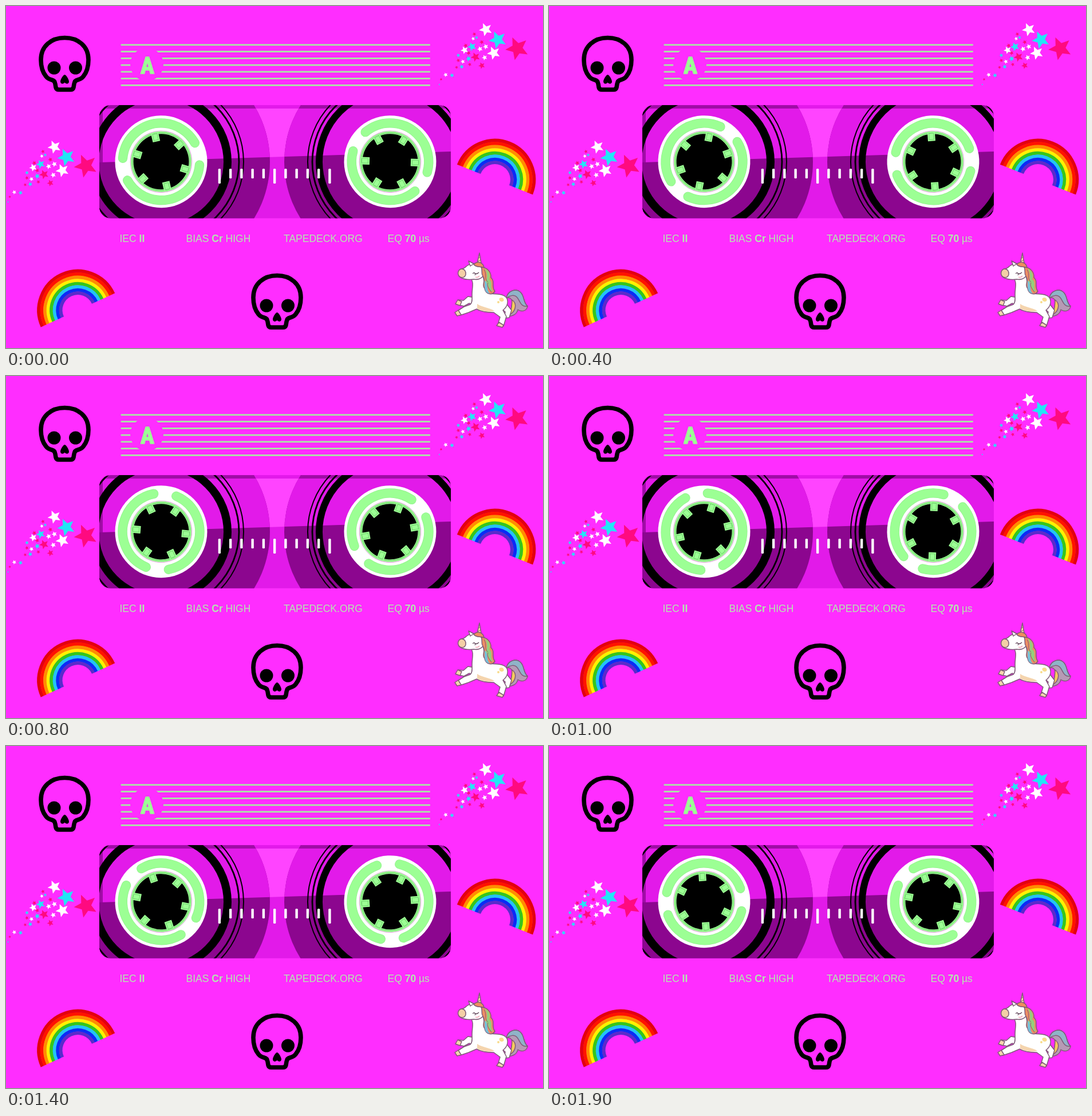
An HTML page with a canvas that plays this animation: 938x597 px, repeating every 2 s.

```html
<!DOCTYPE html>
<html lang="en">
<head>
<meta charset="utf-8">
<title>Cassette</title>
<style>
html, body { margin: 0; width: 100%; height: 100%; overflow: hidden; background: #ff2dff; }
canvas { display: block; }
</style>
</head>
<body>
<canvas id="stage" width="938" height="597"></canvas>
<script>
const ctx = document.getElementById('stage').getContext('2d');
const TAU = Math.PI * 2, RAD = Math.PI / 180;
const PINK = '#ff2dff', GREEN = '#9cff94', MINT = '#b2eaae';
const LOOP = 2000, STEP = 100, TURN = -9;

function at(x, y, deg, draw) {
  ctx.save();
  ctx.translate(x, y);
  ctx.rotate(deg * RAD);
  draw();
  ctx.restore();
}

function disc(x, y, r, color) {
  ctx.fillStyle = color;
  ctx.beginPath();
  ctx.arc(x, y, r, 0, TAU);
  ctx.fill();
}

function ring(x, y, r, width, color, from = 0, to = 360) {
  ctx.strokeStyle = color;
  ctx.lineWidth = width;
  ctx.beginPath();
  ctx.arc(x, y, r, from * RAD, to * RAD);
  ctx.stroke();
}

function shape(d, fill, stroke, width) {
  const path = new Path2D(d);
  if (fill) {
    ctx.fillStyle = fill;
    ctx.fill(path);
  }
  if (stroke) {
    ctx.strokeStyle = stroke;
    ctx.lineWidth = width;
    ctx.stroke(path);
  }
}

// Label area
function drawLabel() {
  ctx.fillStyle = '#a8eaa4';
  for (let i = 0; i < 7; i++) {
    ctx.beginPath();
    ctx.roundRect(200.5, 66.6 + i * 11.75, 540.5, 2.7, 1.3);
    ctx.fill();
  }
  disc(246, 102, 29, PINK);
  ctx.fillStyle = ctx.strokeStyle = GREEN;
  ctx.lineWidth = 1.6;
  ctx.textAlign = 'center';
  ctx.font = '900 40px "Roboto Condensed", "Open Sans Condensed", Roboto, sans-serif';
  ctx.fillText('A', 247, 118);
  ctx.strokeText('A', 247, 118);
}

function drawText(x, parts) {
  ctx.textAlign = 'left';
  ctx.fillStyle = MINT;
  parts.forEach((part, i) => {
    ctx.font = (i % 2 ? 'bold ' : '') + '17.5px "Liberation Sans", Arial, sans-serif';
    ctx.fillText(part, x, 412);
    x += ctx.measureText(part).width;
  });
}

// Window with the two tape packs
function below(color) {
  ctx.fillStyle = color;
  ctx.beginPath();
  ctx.moveTo(163, 273);
  ctx.lineTo(777, 254);
  ctx.lineTo(777, 371);
  ctx.lineTo(163, 371);
  ctx.fill();
}

// Fills one layer with its shaded rim and its darker lower part
function drawLayer(light, rim, dark) {
  ctx.fillStyle = rim;
  ctx.fillRect(163, 173, 614, 198);
  ctx.fillStyle = light;
  ctx.fillRect(169, 179, 608, 192);
  below(dark);
}

function drawWindow() {
  ctx.save();
  ctx.beginPath();
  ctx.roundRect(163, 173, 614, 197.5, 20);
  ctx.clip();
  drawLayer('#ff44ff', '#e21ae9', '#e21ae9');

  ctx.save();
  ctx.beginPath();
  ctx.arc(271, 272, 190, 0, TAU);
  ctx.moveTo(856, 272);
  ctx.arc(671, 272, 185, 0, TAU);
  ctx.clip();
  drawLayer('#e21ae9', '#a00ca6', '#8c068f');
  ctx.restore();

  ring(271, 272, 116, 14, '#000');
  ring(671, 272, 124, 12, '#000');
  for (const x of [271, 671]) {
    ring(x, 272, 136, 2.8, '#000');
    ring(x, 272, 144, 2, '#000');
  }
  ctx.restore();
}

function drawTicks() {
  ctx.fillStyle = '#fff';
  for (let i = 0; i < 11; i++) {
    ctx.beginPath();
    ctx.roundRect(370.7 + i * 19.25, 284, 4.4, i % 5 ? 17 : 26, 1.5);
    ctx.fill();
  }
}

function drawReel(x, y, deg) {
  at(x, y, deg, () => {
    disc(0, 0, 80.5, '#fff');
    ctx.lineCap = 'round';
    for (const start of [17, 197]) {
      ring(0, 0, 67.3, 16.4, '#8ff08a', start, start + 146);
      ring(0, 0, 67.3, 15, GREEN, start, start + 146);
    }
    ctx.lineCap = 'butt';
    disc(0, 0, 53.5, GREEN);
    ring(0, 0, 53.8, 0.8, '#f58cf0');
    ring(0, 0, 50.5, 0.8, '#5fb65c');
    disc(0, 0, 48.5, '#000');
    for (let i = 0; i < 6; i++) {
      at(0, 0, i * 60 - 31, () => {
        ctx.fillStyle = GREEN;
        ctx.fillRect(36, -6.5, 14.5, 13);
        ctx.strokeStyle = '#68c565';
        ctx.lineWidth = 0.8;
        ctx.strokeRect(38.5, -4, 11, 8);
      });
    }
  });
}

// Stickers
function drawSkull(dx, dy) {
  at(dx, dy, 0, () => {
    ctx.lineJoin = 'round';
    shape('M61 94C61 70 79 55.5 102.5 55.5S144 70 144 94C144 107 140 117 135 123Q132 127 125 129' +
      'Q120 130 119 136L118 142Q117 146 113 146H92Q88 146 87 142L86 136Q85 130 80 129' +
      'Q73 127 70 123C65 117 61 107 61 94Z', null, '#000', 7.6);
    disc(84, 108, 11.5, '#000');
    disc(121.5, 108, 11.5, '#000');
    shape('M102.5 120C105 120 110 128 110 132C110 136 105 137 102.5 133.5' +
      'C100 137 95 136 95 132C95 128 100 120 102.5 120Z', '#000');
  });
}

const BANDS = ['#e3000f', '#ff1200', '#ff8c00', '#fff200', '#35c71a', '#22c4f5', '#0a2cf5', '#5a2bcb'];

function drawRainbow(x, y, deg) {
  at(x, y, deg, () => BANDS.forEach((color, i) => ring(0, 0, 68.3 - i * 5.5, 5.8, color, 180, 360)));
}

const STARS = {
  '#ff0a80': [[893, 74, 21], [820, 89, 8.5], [831, 104, 6], [831, 63, 4], [803, 69, 4], [818, 49, 3.5],
    [808, 82, 4], [790, 95, 3.5], [787, 107, 3], [810, 102, 3.5], [760, 128, 2.5]],
  '#22e6f5': [[859, 59, 16], [814, 71, 8], [808, 92, 5], [822, 55, 3], [790, 86, 3.5], [796, 106, 4],
    [779, 121, 4], [757, 137, 1.5]],
  '#ffffff': [[838, 41, 12], [852, 82, 12], [801, 77, 7], [838, 71, 5], [828, 75, 5], [836, 90, 5],
    [816, 57, 3.5], [798, 97, 4], [768, 120, 4]]
};

function drawStar(x, y, r) {
  ctx.beginPath();
  for (let i = 0; i < 10; i++) {
    const a = (i * 36 - 42) * RAD, d = i % 2 ? r * 0.45 : r;
    ctx.lineTo(x + d * Math.cos(a), y + d * Math.sin(a));
  }
  ctx.fill();
}

function drawStars(dx, dy) {
  at(dx, dy, 0, () => {
    for (const color in STARS) {
      ctx.fillStyle = color;
      STARS[color].forEach(s => drawStar(...s));
    }
  });
}

function drawUnicorn() {
  const line = '#805a78', tan = '#f5d5ae';
  const part = (d, fill) => shape(d, fill, line, 1.5);
  ctx.lineJoin = 'round';
  // Tail
  part('M874 510C876 497 891 492 899 500C906 507 903 517 911 524C910 532 901 535 894 530' +
    'C893 537 885 543 875 541C884 533 883 525 884 518C884 510 879 508 874 510Z', '#b79ab5');
  part('M874 510C876 497 891 492 899 500C906 507 903 517 911 524C899 526 898 515 893 509C888 503 880 505 874 510Z', '#8fb4c8');
  part('M884 513C893 519 892 535 875 541C884 533 883 525 884 513Z', '#f7c95f');
  // Far legs
  part('M824 510L807 507L799 514L790 513L787 521L800 524L809 519L825 524Z', '#fff');
  part('M860 523L872 534L870 545L879 544L883 531L872 517Z', '#fff');
  // Neck, body and near legs
  part('M811 473C818 482 814 492 814 503C814 511 815 518 811 521L800 525L789 532L793 540' +
    'L808 535L822 529C832 535 844 535 852 535L863 543L860 553L869 559L874 542L868 531' +
    'C877 524 879 513 872 507C862 499 848 507 838 497L833 469Z', '#fff');
  shape('M823 520C831 526 843 526 853 532C844 535 832 533 823 528Z', tan);
  shape('M862 510C867 507 871 511 869 515C865 518 860 514 862 510Z', '#f8dc8c');
  disc(860, 517, 2, '#f8dc8c');
  part('M789 513L796 516L793 523L785 520Z', tan);
  part('M790 531L795 539L788 541L784 535Z', tan);
  part('M861 552L869 557L867 561L857 558Z', tan);
  // Head
  part('M806 453C816 446 833 450 836 461C837 472 828 479 817 477C809 478 800 477 794 474' +
    'C788 470 789 461 795 459C800 459 802 456 806 453Z', '#fff');
  part('M795 459C801 458 804 464 803 469C801 475 795 475 792 472C788 468 789 461 795 459Z', '#f3cfa5');
  part('M811 454L808 445L817 450Z', '#fff');
  part('M822 454L827 431L831 455Z', '#f6dfa6');
  shape('M824 446L830 443M823 451L831 448M825 440L829 438', null, line, 1);
  shape('M817 465Q821 470 826 465M817 466L815 467M820 468L819 470', null, '#604458', 1.3);
  shape('M820 473Q824 475 827 471', null, '#f5a5b5', 1.5);
  // Mane
  part('M830 456C841 456 848 465 847 474C855 481 847 489 854 498C849 506 838 503 836 493' +
    'C830 486 839 480 833 472C829 465 833 461 830 456Z', '#ee8d65');
  shape('M836 458C844 462 847 470 844 477C852 484 844 490 851 498C842 499 844 487 838 482C842 473 840 464 836 458Z', '#96ce7c');
  shape('M836 479C844 486 838 493 845 502C837 501 836 494 836 488Z', '#76bfd8');
  part('M817 451C824 444 834 448 835 457C829 453 822 458 817 451Z', '#f08b5e');
  shape('M835 460C841 469 834 475 842 482M842 483C839 490 845 494 848 500', null, line, 1);
}

function draw(step) {
  ctx.fillStyle = PINK;
  ctx.fillRect(0, 0, 938, 597);
  drawLabel();
  drawWindow();
  drawReel(271, 271.7, 348 + step * TURN);
  drawReel(671, 271.7, 33 + step * TURN);
  drawTicks();
  drawText(198.5, ['IEC ', 'II']);
  drawText(314.5, ['BIAS ', 'Cr', ' HIGH']);
  drawText(485, ['TAPEDECK.ORG']);
  drawText(666.5, ['EQ ', '70', ' µs']);
  drawSkull(0, 0);
  drawSkull(371, 415);
  drawStars(0, 0);
  drawStars(-753.5, 205);
  drawRainbow(854, 303, 21.7);
  drawRainbow(125.5, 531, -24.6);
  drawUnicorn();
}

let shown = -1;
function tick() {
  const step = Math.floor((performance.now() % LOOP) / STEP);
  if (step !== shown) draw(shown = step);
  requestAnimationFrame(tick);
}
tick();
</script>
</body>
</html>
```
